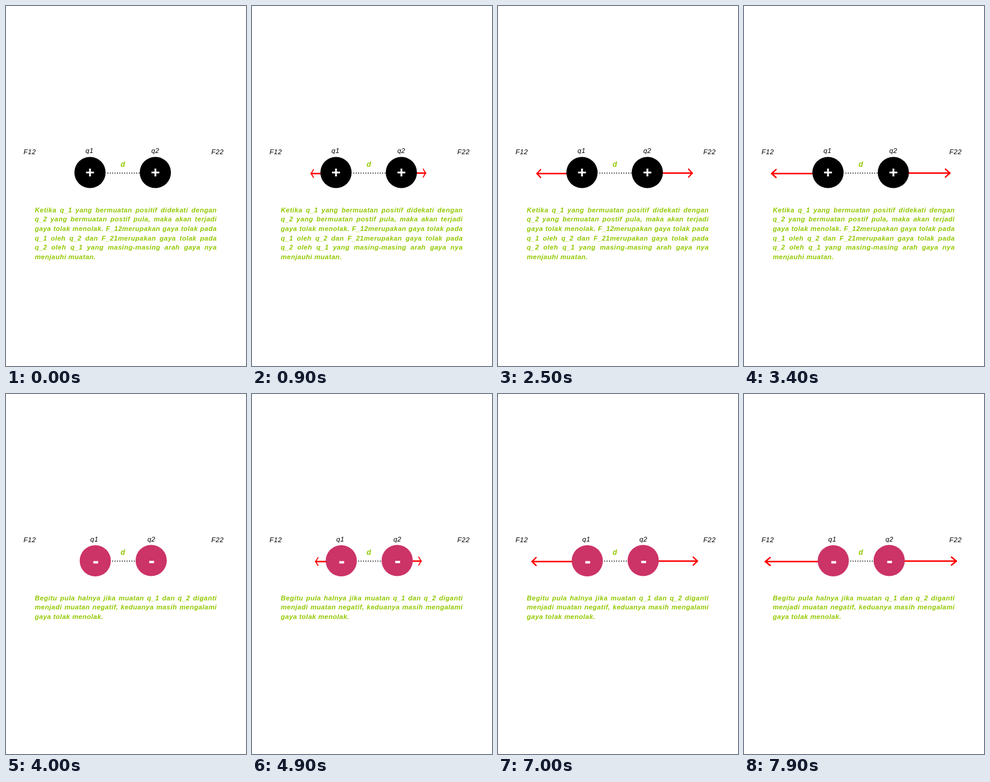
Animation of 400x600 px, one loop 8000 ms. Source, as an HTML page:

```html
<!DOCTYPE html>
<html lang="id">
<head>
<meta charset="utf-8">
<style>
  html, body { margin: 0; width: 100%; height: 100%; overflow: hidden; background: #fff; }
  svg { position: absolute; left: 0; top: 0; }
  text, #note { font: italic 11.2px "Liberation Sans", Arial, sans-serif; letter-spacing: .42px; }
  #d, #note { font-weight: bold; fill: #92c800; color: #92c800; }
  #d { font-size: 12px; }
  #note { position: absolute; left: 48px; top: 332.5px; width: 303.4px; line-height: 15.7px; }
  #note div { white-space: nowrap; text-align-last: justify; }
  #note div:last-child { text-align-last: left; }
  .arrow { fill: none; stroke: #f00; stroke-width: 2.5; stroke-linejoin: round; stroke-linecap: round; }
  .dots { stroke: #000; stroke-width: 1.5; stroke-dasharray: 1.5 2.5; }
</style>
</head>
<body>
<svg width="400" height="600">
  <g class="arrow">
    <path id="left"/>
    <path id="right"/>
    <path id="headL" d="M9 -6.6L1.2 0L9 6.6"/>
    <path id="headR" d="M9 -6.6L1.2 0L9 6.6"/>
  </g>
  <g id="charges"></g>
  <text x="29.3" y="247">F12</text>
  <text x="342.3" y="247">F22</text>
  <text id="d" x="191" y="268">d</text>
</svg>
<div id="note"></div>
<script>
const $ = id => document.getElementById(id);
const STEP = 100, STEPS = 40, LEFT_Y = 279.2, RIGHT_Y = 278.5;

const scenes = [
  {
    color: '#000', x: [140, 248.9], y: [277.5, 277.5], labelX: [132.6, 242.2], labelY: 245,
    dots: [169, 223], sign: 'M-6.5 -1.5h13v3h-13zM-1.5 -6.5h3v13h-3z', signAt: [[140, 277.5], [249, 277.5]],
    speed: [2.118, 2.17],
    note: ['Ketika q_1 yang bermuatan positif didekati dengan',
      'q_2 yang bermuatan postif pula, maka akan terjadi',
      'gaya tolak menolak. F_12merupakan gaya tolak pada',
      'q_1 oleh q_2 dan F_21merupakan gaya tolak pada',
      'q_2 oleh q_1 yang masing-masing arah gaya nya',
      'menjauhi muatan.']
  },
  {
    color: '#c36', x: [148.8, 242], y: [278, 277.5], labelX: [140.6, 235.7], labelY: 246,
    dots: [177, 215], sign: 'M-4 -2h8v4h-8z', signAt: [[149.5, 280.5], [242.7, 280]],
    speed: [2.37, 2.42],
    note: ['Begitu pula halnya jika muatan q_1 dan q_2 diganti',
      'menjadi muatan negatif, keduanya masih mengalami',
      'gaya tolak menolak.']
  }
];

function showScene(s) {
  const charge = i => `<circle cx="${s.x[i]}" cy="${s.y[i]}" r="26" fill="${s.color}"/>
    <path d="${s.sign}" fill="#fff" transform="translate(${s.signAt[i]})"/>
    <text x="${s.labelX[i]}" y="${s.labelY}">q${i + 1}</text>`;
  $('charges').innerHTML = charge(0) + charge(1) +
    `<path class="dots" d="M${s.dots[0]} 278.5H${s.dots[1]}"/>`;
  $('note').innerHTML = s.note.map(line => `<div>${line}</div>`).join('');
}

// Heads stretch sideways as the arrows grow.
function placeArrows(s, step) {
  const rest = STEPS - 1 - step, k = 0.35 + 0.017 * step;
  const l = 34.4 + s.speed[0] * rest, r = 355 - s.speed[1] * rest;
  $('left').setAttribute('d', `M${s.x[0]} ${LEFT_Y}H${l + 1.2 * k}`);
  $('right').setAttribute('d', `M${s.x[1]} ${RIGHT_Y}H${r - 1.2 * k}`);
  $('headL').setAttribute('transform', `translate(${l} ${LEFT_Y}) scale(${k} 1)`);
  $('headR').setAttribute('transform', `translate(${r} ${RIGHT_Y}) scale(${-k} 1)`);
}

let shown;
function draw(now) {
  const tick = Math.floor(now / STEP) % (STEPS * scenes.length);
  const scene = scenes[Math.floor(tick / STEPS)];
  if (scene !== shown) showScene(shown = scene);
  placeArrows(scene, tick % STEPS);
}

const start = performance.now();
function loop() {
  draw(performance.now() - start);
  requestAnimationFrame(loop);
}
loop();
</script>
</body>
</html>
```
